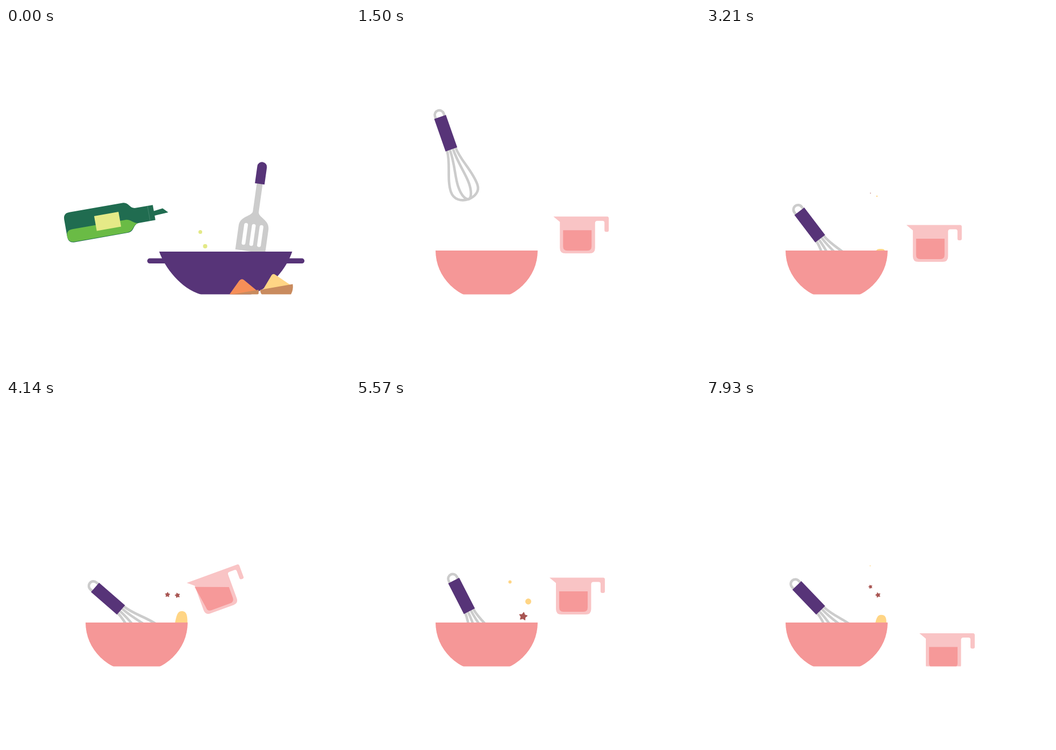
Write an HTML page with a canvas that moves like this. It is 640 px wide and 640 px high and loops after 8000 ms.

```html
<!DOCTYPE html>
<html lang="en">
<head>
<meta charset="utf-8">
<title>Mixing</title>
<style>
html, body { margin: 0; width: 100%; height: 100%; overflow: hidden; background: #fff; }
canvas { display: block; width: 100%; height: 100%; object-fit: contain; }
</style>
</head>
<body>
<canvas width="640" height="640"></canvas>
<script>
const ctx = document.querySelector('canvas').getContext('2d');
const LOOP = 8000, FLOOR = 495.5, RIM = 414;
const PURPLE = '#573478', GREY = '#ccc', YELLOW = '#ffd585', CRUST = '#c98b5e';
const PINK = '#f59797', PALE = '#f9cbcb', GLASS = '#f9c4c5', BROWN = '#a85552', LIME = '#e3e987';

const clamp = v => Math.min(1, Math.max(0, v));
const mix = (a, b, k) => a + (b - a) * k;
const linear = (t, a, b) => clamp((t - a) / (b - a));
const ease = (t, a, b) => {
  const p = linear(t, a, b);
  return p < .5 ? 2 * p * p : 1 - 2 * (1 - p) ** 2;
};
// Distance still to travel for something braking to a stop at time `end`.
const braking = (t, end) => .00123 * Math.max(0, end - t) ** 2;
const rad = deg => deg * Math.PI / 180;

function fill(path, color) {
  ctx.fillStyle = color;
  ctx.fill(typeof path === 'string' ? new Path2D(path) : path);
}
function stroke(path, color, width, cap = 'butt') {
  ctx.strokeStyle = color;
  ctx.lineWidth = width;
  ctx.lineCap = cap;
  ctx.stroke(new Path2D(path));
}
function disc(x, y, r, color) {
  ctx.beginPath();
  ctx.arc(x, y, r, 0, 7);
  ctx.fillStyle = color;
  ctx.fill();
}
function at(x, y, deg, draw) {
  ctx.save();
  ctx.translate(x, y);
  ctx.rotate(rad(deg));
  draw();
  ctx.restore();
}

function drawBottle() {
  fill('M12-27.5H112C125-27.5 122-14 136-14H167V-2.5L184-4.5L193 4.5L167 6V14.5H136C124 14.5 126 29 112 29H12Q0 29 0 17V-16Q0-27.5 12-27.5Z', '#206c50');
  fill('M0 16Q0 4.5 12 4.5H112C122 4.5 126 14 134 14.5C124 16 124 28 112 28H12Q0 28 0 16Z', '#6abb45');
  stroke('M157-14V14.5', '#4d8a73', .8);
  fill('M56-12.5H102V15.5H56Z', '#e5ea87');
}

function drawSpatula() {
  fill('M-5.5-2V52C-5.5 62-28 64-28 82V127H28V82C28 64 5.5 62 5.5 52V-2Z', GREY);
  for (const x of [-14.5, 0, 14.5]) stroke(`M${x} 79V113`, '#fff', 7, 'round');
  fill('M-9 0V-32A9 9 0 0 1 9-32V0Z', PURPLE);
}

function drawWokScene(t) {
  const away = (t / 500) ** 2;
  if (away > 1.2) return;
  at(111 - 320 * away, 372, -10, drawBottle);
  if (t < 150) {
    disc(361.5, 379.5 + t * .15, 3.5, LIME);
    disc(370.5, 406 + t * .15, 4, LIME);
  }
  at(400 * away, 0, 0, () => {
    at(472, 290, 8, drawSpatula);
    stroke('M267.5 433.3H550.5', PURPLE, 9.5, 'round');
    fill('M285 416C295 445 325 485 363 496H455C493 485 523 445 532.5 416Z', PURPLE);
    fill('M415.5 496L434 470Q438.5 465 443 469L466 488L440 496Z', '#f68f58');
    fill('M418 496L470 487V493Q470 496 467 496Z', CRUST);
    fill('M478 487L494 460Q497 456 501 459L529 478Z', YELLOW);
    fill('M473 487L533.5 476.5Q535 487 530 496H476Q473 493 473 487Z', CRUST);
  });
}

const bowlPath = (() => {
  const p = new Path2D();
  p.ellipse(243, RIM, 95, 92, 0, 0, Math.PI);
  return p;
})();

function drawBowl(t) {
  ctx.save();
  ctx.translate(-braking(t, 1156), 0);
  fill(bowlPath, PALE);
  ctx.clip(bowlPath);
  ctx.translate(braking(t, 1156) - braking(t, 1274), 0);
  fill(bowlPath, PINK);
  ctx.restore();
}

const stirAngle = t => 42.5 + 15.7 * Math.cos(2 * Math.PI * (t - 2148) / 626);

function drawWhisk(t) {
  const dip = ease(t, 1660, 2000);
  const stir = stirAngle(t), a = rad(stir);
  const x = mix(177.5 - braking(t, 916), 206.4 + 10 * Math.sin(a), dip);
  const y = mix(270 - 48 * ease(t, 1100, 1600), 384 + 10 * Math.cos(a), dip);
  at(x, y, -mix(19.3, stir, dip), () => {
    stroke('M-8.5 0C-10 25-27 50-27 75C-27 105 24 105 24 78C24 50 9 25 8.5 0', GREY, 4.7);
    stroke('M-3 0C-3 30-11 50-11 70C-11 88-6 97 0 98C6 97 10 85 10 70C10 50 3 30 3 0', GREY, 4.7);
    stroke('M-8.5-63V-68A8.5 8.5 0 0 1 8.5-68V-63', GREY, 4.7);
    fill('M-11.5-64H11.5V0H-11.5Z', PURPLE);
  });
}

// Batter pushed up at the far rim when the whisk handle leans down.
function drawBatter(t) {
  const h = 23 * ease(stirAngle(t), 32, 53) * ease(t, 1950, 2150);
  if (h < .5) return;
  const top = RIM - h, w = h / 23;
  fill(`M${316 - 2 * w} 416C317 ${RIM - h * .6} ${320 - w} ${top} ${324 + 3 * w} ${top}
    C${330 + 7 * w} ${top} ${332 + 6 * w} ${RIM - h * .6} ${332 + 6 * w} 416Z`, YELLOW);
}

const shapes = {
  drop: r => disc(0, 0, 9 * r, YELLOW),
  star: r => {
    ctx.beginPath();
    for (let i = 0; i < 10; i++) {
      const d = r * (i % 2 ? 4.9 : 9.1), a = i * Math.PI / 5;
      ctx.lineTo(d * Math.sin(a), -d * Math.cos(a));
    }
    ctx.closePath();
    ctx.fillStyle = ctx.strokeStyle = BROWN;
    ctx.lineWidth = 1.5 * r;
    ctx.lineJoin = 'round';
    ctx.fill();
    ctx.stroke();
  },
  tomato: r => {
    disc(0, 0, 19.5 * r, '#f26363');
    ctx.scale(r, r);
    fill('M3-17L10-21L9-14Z', '#f26363');
  }
};
// [launch time, x, shape]
const bits = [
  [2182, 309, 'star'], [2196, 303, 'star'], [2780, 306, 'star'], [2820, 318, 'drop'],
  [3330, 290, 'drop'], [3380, 312, 'star'], [3966, 300.5, 'star'], [3970, 319, 'star'],
  [4530, 305, 'drop'], [4600, 318, 'star'], [4760, 297, 'tomato'],
  [5309, 286.5, 'drop'], [5436, 320.5, 'drop'], [5514, 311, 'star'], [5820, 304, 'star'],
  [6546, 296.5, 'tomato'], [6870, 312, 'star'], [7050, 290, 'drop'],
  [7510, 305.5, 'drop'], [7704, 306, 'star'], [7758, 320, 'star']
];

function drawBits(t) {
  for (const [start, x, shape] of bits) {
    const p = (t - start) / 620;
    if (p <= 0 || p >= 1) continue;
    const size = (1 - p) ** 2;
    at(x, 295 + 130 * size, shape === 'star' ? 20 * Math.sin(start + x) : 0, () => shapes[shape](size));
  }
}

function drawStream(t, start, end) {
  if (t < start || t > end + 120) return;
  const top = mix(345, RIM, linear(t, end, end + 120));
  const bottom = mix(350, RIM, linear(t, start, start + 110));
  ctx.save();
  ctx.beginPath();
  ctx.rect(270, top, 70, bottom - top);
  ctx.clip();
  fill('M326 352.5C296 356 280 380 279 414H302C300 387 303 365 318 360Z', YELLOW);
  ctx.restore();
}

function drawCup(t) {
  const lift = ease(t, 1150, 1660) - ease(t, 3010, 3490) + ease(t, 3500, 3980) - ease(t, 5580, 6060);
  const pour = ease(t, 1670, 1960) - ease(t, 2610, 2940) + ease(t, 4000, 4290) - ease(t, 5170, 5500);
  const wobble = 10 * Math.sin(Math.PI * linear(t, 700, 880));
  const lean = clamp(pour * 1.8), spout = Math.max(0, 2 * pour - 1);
  const lx = mix(6, -2, lean), ly = mix(-43, -59, lean);
  const x = 409 - 37 * lift - 2 * pour + braking(t, 740);
  const y = 502.5 - 103.5 * lift + 3 * pour;
  at(x, y, -43 * pour - wobble, () => {
    fill('M-12-68.5H88Q91-68.5 91-65V-43Q91-40 88-40H86Q83-40 83-43V-57Q83-60.5 79.5-60.5H69.5Q65.5-60.5 65.5-56V-10Q65.5 0 55.5 0H10Q0 0 0-10V-58.5Z', GLASS);
    fill(`M${lx} ${ly}L${lx - 10 * spout} ${ly - 8 * spout}L${lx - 2 * spout} ${ly - 9.5 * spout}
      L59 ${mix(-43, -24, pour)}V-13Q59-5 51-5H14Q6-5 6-13Z`, '#f69999');
  });
}

function frame(now) {
  const t = now % LOOP;
  ctx.clearRect(0, 0, 640, 640);
  ctx.save();
  ctx.beginPath();
  ctx.rect(0, 0, 640, FLOOR);
  ctx.clip();
  drawWokScene(t);
  drawWhisk(t);
  drawBits(t);
  drawBatter(t);
  drawStream(t, 1930, 2560);
  drawStream(t, 4260, 5120);
  drawBowl(t);
  drawCup(t);
  ctx.restore();
}

let begin;
function tick(now) {
  begin ??= now;
  frame(now - begin);
  requestAnimationFrame(tick);
}
requestAnimationFrame(tick);
</script>
</body>
</html>
```
